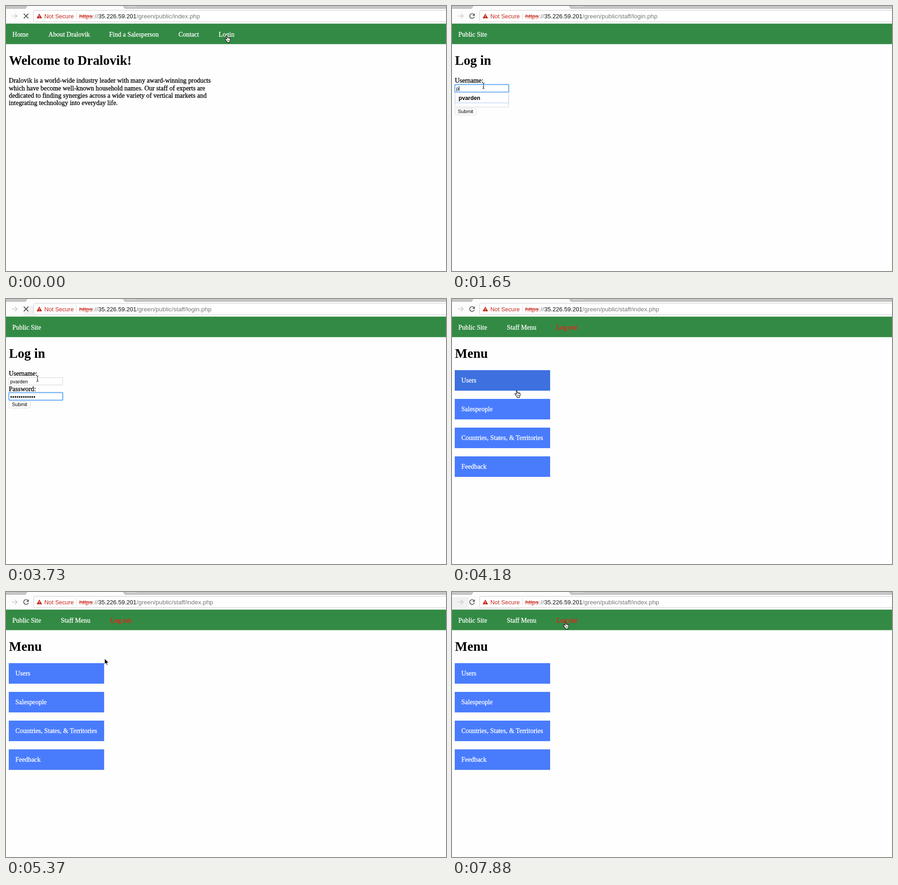
Write an HTML page that moves like this. It is 964 px wide and 581 px high and loops after 8 s.

```html
<!DOCTYPE html>
<html lang="en">
<head>
<meta charset="utf-8">
<title>Staff login</title>
<style>
  html, body { margin: 0; width: 100%; height: 100%; overflow: hidden; background: #fefefe; }
  svg { display: block; width: 964px; height: 581px; }
  text { white-space: pre; fill: currentColor; }
  .serif { font: 14.4px "Liberation Serif", "Times New Roman", serif; stroke: currentColor; stroke-width: .3px; }
  .title { font: bold 28.8px "Liberation Serif", "Times New Roman", serif; }
  .sans { font: 10.8px "Liberation Sans", Arial, sans-serif; }
  .option { font: bold 12.2px "Liberation Sans", Arial, sans-serif; }
  .url { font: 13.45px "Liberation Sans", Arial, sans-serif; }
  .url .warning { font-size: 12.9px; }
  .url .host { font-size: 13.1px; }
</style>
</head>
<body>
<svg viewBox="0 0 964 581" xmlns="http://www.w3.org/2000/svg">
  <rect width="964" height="581" fill="#fefefe"/>

  <!-- browser chrome -->
  <rect width="964" height="39" fill="#fcfcfc"/>
  <path d="M0 0H46L43 5.5H0ZM257 0H964V5.5H261Z" fill="#c6c6c6"/>
  <path d="M0 5.5H42Q44 5 46 0M257 0Q259 5 261 5.5H964" fill="none" stroke="#b2b2b2"/>
  <path d="M263 0H288L286 2H266Z" fill="#d6d6d6"/>
  <path id="shade" fill="#f1f1f1"/>
  <path d="M13 22H24M19.5 17L24.5 22L19.5 27" fill="none" stroke="#cbcbcb" stroke-width="1.7"/>
  <path id="stop" d="M39 17L49 27M49 17L39 27" stroke="#5a5a5a" stroke-width="1.8"/>
  <g id="reload">
    <path d="M48.3 19A5.2 5.2 0 1 0 49 23.4" fill="none" stroke="#5a5a5a" stroke-width="1.7"/>
    <path d="M50 16V21.4H44.6Z" fill="#5a5a5a"/>
  </g>
  <rect x="60.5" y="9.5" width="920" height="25" rx="3" fill="#fff" stroke="#cdcdcd"/>
  <path d="M73 16.5L79 27H67Z" fill="#c5281c"/>
  <path d="M73 20V23.6M73 24.6V25.8" stroke="#fff" stroke-width="1.1"/>
  <path d="M154.5 14V30" stroke="#d9d9d9"/>
  <g class="url">
    <text class="warning" x="84" y="26.6" color="#c5281c">Not Secure</text>
    <text x="160.5" y="26.6" color="#c5281c">https</text>
    <path d="M160 22.5H190" stroke="#c5281c" stroke-width="1.2"/>
    <text x="190.5" y="26.6" color="#777">://</text>
    <text class="host" x="202" y="26.6" color="#111">35.226.59.201</text>
    <text id="path" x="286" y="26.6" color="#777"></text>
  </g>

  <rect y="38.6" width="964" height="45" fill="#338a44"/>

  <g id="home"></g>
  <g id="login">
    <g id="userBox"></g>
    <text id="user" class="sans" x="9" y="185"></text>
    <g id="passBox"></g>
    <g id="dots"></g>
    <g id="menuPopup">
      <rect x="6" y="190" width="119" height="15" fill="#fefefe"/>
      <rect x="6.5" y="189.5" width="117.5" height="23" fill="#fff" stroke="#a9c6f0"/>
      <text class="option" x="14.5" y="206">pvarden</text>
    </g>
    <path id="caret" stroke="#000"/>
    <rect x="6.5" y="224.5" width="47" height="14.5" rx="3" fill="#fff" stroke="#d9d9d9"/>
    <text class="sans" x="13" y="235.2">Submit</text>
  </g>
  <g id="menu"></g>

  <g id="hand">
    <path d="M4.6.6C3.6.6 3.3 1.4 3.6 2.3L5 8L3 6.9C1.6 6.2.4 7.2 1.2 8.4L5 13.4L5.5 15.4H11L11.3 13.5C12.6 11.8 12.8 9.5 12.4 6.6C12 5.3 10.6 5.4 10.4 6.2C10 4.7 8.6 4.9 8.3 5.7C8 4.4 6.8 4.5 6.4 5L5.7 1.6C5.5.9 5.2.6 4.6.6Z" fill="#fff" stroke="#111" stroke-width="1.1"/>
    <path d="M6.6 9.5V12.5M8.4 9.5V12.5M10.2 9.5V12.5" stroke="#333" stroke-width=".8"/>
  </g>
  <path id="arrow" d="M0 0V12.5L2.9 9.8L4.8 14.2L6.9 13.3L5 9H9Z" fill="#000" stroke="#fff" stroke-width=".9"/>
  <path id="beam" d="M-2.5-6.5Q0-6.5 0-4.5Q0-6.5 2.5-6.5M0-4.5V4.5M-2.5 6.5Q0 6.5 0 4.5Q0 6.5 2.5 6.5M-1.5 2.5H1.5" fill="none" stroke="#222"/>
</svg>
<script>
const LOOP = 8000;
const el = id => document.getElementById(id);

function add(parent, tag, attrs, text = '') {
  const node = document.createElementNS('http://www.w3.org/2000/svg', tag);
  for (const key in attrs) node.setAttribute(key, attrs[key]);
  node.textContent = text;
  return parent.appendChild(node);
}
const write = (parent, x, y, text, color = '#000', cls = 'serif') =>
  add(parent, 'text', { x, y, color, class: cls }, text);
const show = (id, on) => el(id).setAttribute('display', on ? 'inline' : 'none');

function page(id, title, links) {
  const g = el(id);
  for (const [x, label, color = '#fff'] of links) write(g, x, 66.8, label, color);
  write(g, 6.5, 128.8, title, '#000', 'title');
  return g;
}

const home = page('home', 'Welcome to Dralovik!', [
  [14, 'Home'], [93, 'About Dralovik'], [226, 'Find a Salesperson'], [378, 'Contact'], [466, 'Login']]);
[
  'Dralovik is a world-wide industry leader with many award-winning products',
  'which have become well-known household names. Our staff of experts are',
  'dedicated to finding synergies across a wide variety of vertical markets and',
  'integrating technology into everyday life.'
].forEach((line, i) => write(home, 6.3, 168.4 + i * 16.2, line));

const login = page('login', 'Log in', [[14, 'Public Site']]);
login.prepend(
  write(login, 6.3, 168.4, 'Username:'),
  write(login, 6.3, 201.6, 'Password:'));

function inputBox(id, y) {
  const g = el(id);
  add(g, 'rect', { x: 6.5, y, width: 117.5, height: 16, fill: '#fff', stroke: '#d4d4d4' });
  const ring = add(g, 'g', { fill: 'none' });
  add(ring, 'rect', { x: 5.8, y: y - .8, width: 119, height: 17.6, rx: 2, stroke: '#a5cdf8', 'stroke-width': 1.8 });
  add(ring, 'rect', { x: 6.5, y, width: 117.5, height: 16, stroke: '#5aa7f4', 'stroke-width': 1.4 });
  return ring;
}
const rings = { user: inputBox('userBox', 172.5), pass: inputBox('passBox', 205.5) };
const dots = Array.from({ length: 12 }, (_, i) =>
  add(el('dots'), 'circle', { cx: 11.3 + i * 4.62, cy: 214.8, r: 1.75 }));

const menu = page('menu', 'Menu', [
  [14, 'Public Site'], [120, 'Staff Menu'], [229, 'Log out', '#ff1515']]);
const buttons = ['Users', 'Salespeople', 'Countries, States, & Territories', 'Feedback'].map((label, i) => {
  const y = 156 + i * 63;
  const box = add(menu, 'rect', { x: 6, y, width: 209, height: 45, fill: '#497cfd' });
  write(menu, 20.5, y + 27, label, '#fff');
  return box;
});

const paths = {
  home: '/green/public/index.php',
  login: '/green/public/staff/login.php',
  menu: '/green/public/staff/index.php'
};
const hover = 'M0 11H27V34H0Z';
const trail = 'M0 11H37V39H0Z';

// Each step changes only the listed parts of the state.
const steps = [
  [0, { page: 'home', busy: true, cursor: 'hand', at: [479, 64.5], user: '', dots: 0,
        focus: '', popup: false, caret: 0, hot: false, shade: '' }],
  [300, { page: 'login', busy: false, cursor: 'arrow', at: [470, 72] }],
  [450, { at: [376, 98] }],
  [600, { at: [246, 132] }],
  [760, { at: [138, 160] }],
  [910, { at: [84, 172] }],
  [1060, { cursor: 'beam', at: [69, 175] }],
  [1360, { focus: 'user', caret: 9.5 }],
  [1650, { user: 'p', popup: true, caret: 15.5 }],
  [1800, { user: 'pv', caret: 21.5 }],
  [1940, { user: 'pvard', caret: 36.5 }],
  [2090, { user: 'pvarden', caret: 48.5 }],
  [2390, { popup: false }],
  [2540, { focus: 'pass', caret: 9.5 }],
  [2990, { dots: 6, caret: 37 }],
  [3140, { dots: 12, caret: 64.5 }],
  [3730, { busy: true, caret: 0, shade: 'M38 15H65V39H38Z' }],
  [4180, { page: 'menu', busy: false, cursor: 'hand', at: [137, 200.5], hot: true, shade: '' }],
  [4320, { hot: false }],
  [5070, { at: [173, 197.5] }],
  [5220, { at: [200, 182], hot: true }],
  [5370, { cursor: 'arrow', at: [216, 146], hot: false }],
  [5510, { at: [196, 104] }],
  [5660, { at: [150, 64] }],
  [5810, { cursor: '' }],
  [6100, { cursor: 'arrow', at: [5, 22], shade: hover }],
  [6250, { at: [10, 24] }],
  [6400, { at: [14.5, 25] }],
  [6550, { at: [19, 32] }],
  [6690, { at: [25, 28], shade: trail }],
  [6990, { at: [64, 33], shade: trail + 'M37 26H75V39H37Z' }],
  [7440, { at: [112, 62], shade: trail + 'M37 34H150V39H37Z' }],
  [7590, { at: [170, 84] }],
  [7730, { at: [222, 77] }],
  [7880, { cursor: 'hand', at: [243, 65.5] }]
];

function draw(s) {
  for (const id in paths) show(id, id === s.page);
  el('path').textContent = paths[s.page];
  show('stop', s.busy);
  show('reload', !s.busy);
  el('shade').setAttribute('d', s.shade);

  el('user').textContent = s.user;
  dots.forEach((dot, i) => dot.setAttribute('display', i < s.dots ? 'inline' : 'none'));
  for (const id in rings) rings[id].setAttribute('display', id === s.focus ? 'inline' : 'none');
  show('menuPopup', s.popup);
  const top = s.focus === 'pass' ? 209 : 175.5;
  el('caret').setAttribute('d', s.caret ? `M${s.caret} ${top}v11` : '');

  buttons[0].setAttribute('fill', s.hot ? '#3e71df' : '#497cfd');
  for (const id of ['hand', 'arrow', 'beam']) show(id, id === s.cursor);
  if (s.cursor) el(s.cursor).setAttribute('transform', `translate(${s.at})`);
}

const start = performance.now();
let last = -1;
function tick() {
  const t = (performance.now() - start) % LOOP;
  const count = steps.filter(([at]) => at <= t).length;
  if (count !== last) {
    draw(Object.assign({}, ...steps.slice(0, count).map(step => step[1])));
    last = count;
  }
  requestAnimationFrame(tick);
}
tick();
</script>
</body>
</html>
```
